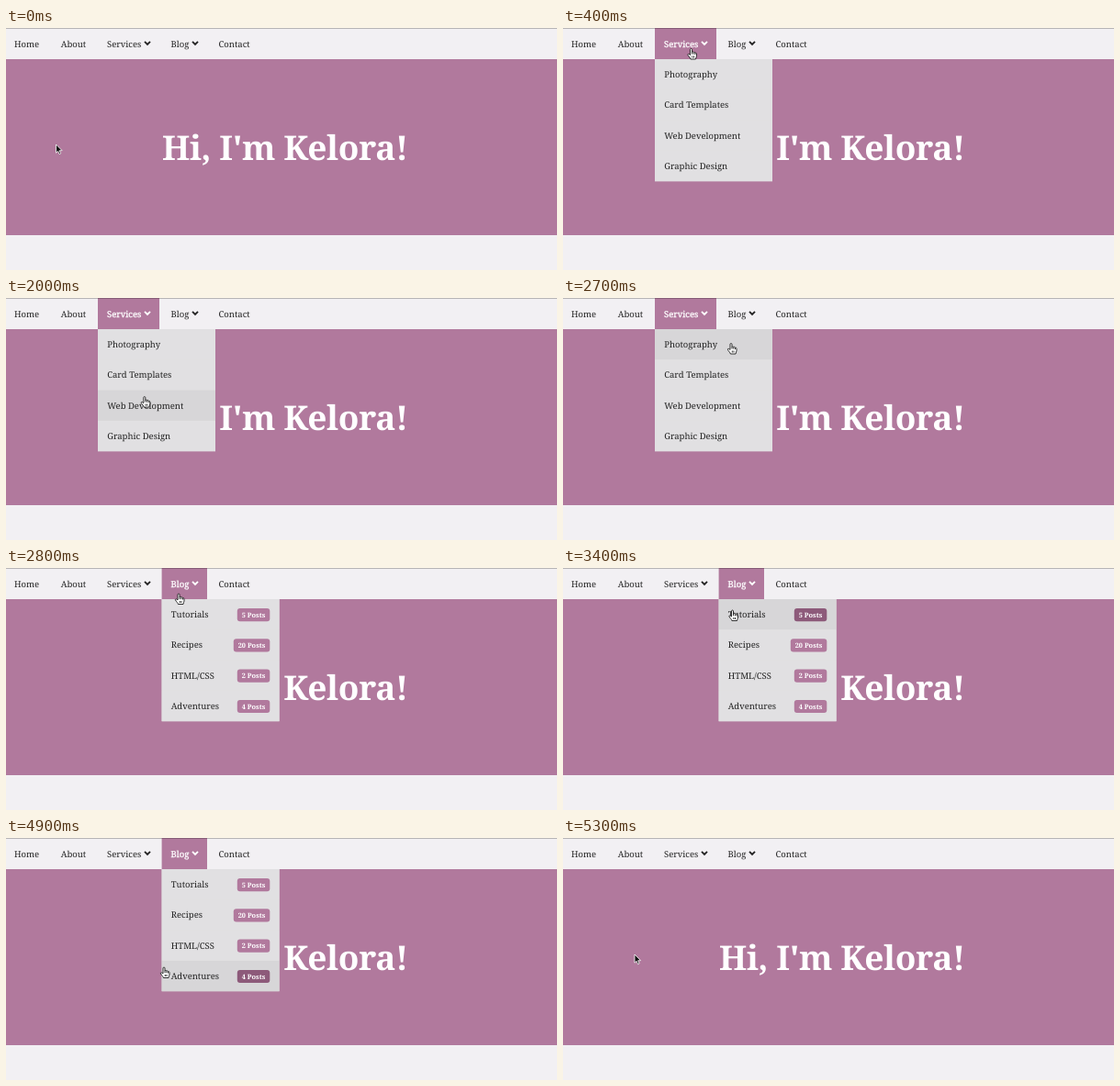
An HTML page that plays this animation: 600x264 px, repeating every 5.5 s.

```html
<!DOCTYPE html>
<html lang="en">
<head>
<meta charset="utf-8">
<title>Dropdown navigation</title>
<style>
  html, body { margin: 0; width: 100%; height: 100%; overflow: hidden; background: #f2f0f3; }
  svg { display: block; width: 100%; height: 100%; }
  text { font-family: "Noto Serif", serif; font-size: 9.5px; fill: #222; text-rendering: geometricPrecision; }
  .hero { font-size: 37px; font-weight: 600; fill: #fff; letter-spacing: -.4px; }
  .badge { font-size: 7.4px; font-weight: 600; fill: #fff; text-anchor: middle; }
  .chevron { fill: none; stroke: #222; stroke-width: 1.9; }
  .open .label { fill: #fff; stroke: #fff; stroke-width: .3; }
  .open .chevron { stroke: #fff; }
</style>
</head>
<body>
<svg id="stage" viewBox="0 0 600 264"></svg>
<script>
const LOOP = 5500, STEP = 100;
const NAV_H = 34, ROW_H = 33.3, MENU_W = 128;
const PURPLE = '#b1799d', DARK = '#8d5a7a', PANEL = '#e1e0e2', HOVER = '#d7d6d8';

const menus = [
  { label: 'Services', x: 100, w: 67, items: ['Photography', 'Card Templates', 'Web Development', 'Graphic Design'] },
  { label: 'Blog', x: 169.6, w: 49.4, items: ['Tutorials', 'Recipes', 'HTML/CSS', 'Adventures'], posts: [5, 20, 2, 4] }
];

// Pointer waypoints: [step, x, y]
const path = [
  [0, 54.5, 127], [1, 57, 124], [3, 118, 52], [4, 139.5, 22.5], [7, 140, 21],
  [8, 140, 17], [9, 140, 48], [11, 143, 143], [13, 139.5, 58.5], [15, 142, 79],
  [16, 142, 79], [17, 143, 50], [22, 156, 146], [23, 160, 122], [25, 160, 122],
  [26, 176, 78], [27, 183, 49.5], [28, 188, 28], [29, 190, 19], [31, 190, 19],
  [34, 184.5, 46], [35, 184.5, 46], [41, 195.5, 112.5], [46, 195, 146],
  [47, 195, 146], [49, 172, 141], [51, 112, 129], [53, 78, 127], [55, 78, 127]
];

const stage = document.getElementById('stage');

function add(parent, tag, attrs = {}, content = '') {
  const el = document.createElementNS('http://www.w3.org/2000/svg', tag);
  for (const key in attrs) el.setAttribute(key, attrs[key]);
  el.textContent = content;
  return parent.appendChild(el);
}
const rect = (parent, x, y, width, height, fill, rx = 0) =>
  add(parent, 'rect', { x, y, width, height, fill, rx });
const text = (parent, x, y, content, cls = '') =>
  add(parent, 'text', { x, y, class: cls }, content);
const show = (el, on) => el.setAttribute('visibility', on ? 'visible' : 'hidden');

rect(stage, 0, 0, 600, 264, '#f2f0f3');
rect(stage, 0, NAV_H, 600, 192, PURPLE);
text(stage, 170, 143.5, "Hi, I'm Kelora!", 'hero');
[['Home', 9], ['About', 59.7], ['Contact', 231.5]].forEach(([s, x]) => text(stage, x, 20.5, s));

function buildMenu(menu) {
  const { x, w, label, items, posts } = menu;
  menu.group = add(stage, 'g');
  menu.tab = rect(menu.group, x, 0, w, NAV_H, PURPLE);
  text(menu.group, x + 10, 20.5, label, 'label');
  add(menu.group, 'path', { class: 'chevron', d: `M${x + w - 16} 14.8l3 3 3-3` });
  menu.panel = add(menu.group, 'g');
  rect(menu.panel, x, NAV_H, MENU_W, ROW_H * 4, PANEL);
  menu.rows = items.map((item, i) => {
    const y = NAV_H + i * ROW_H;
    const back = rect(menu.panel, x, y, MENU_W, ROW_H, PANEL);
    text(menu.panel, x + 10.2, y + 20, item);
    if (!posts) return { back };
    const bw = posts[i] > 9 ? 39.5 : 35.5, bx = x + 117.7 - bw;
    const badge = rect(menu.panel, bx, y + 10, bw, 14.2, PURPLE, 3);
    text(menu.panel, bx + bw / 2, y + 19.8, posts[i] + ' Posts', 'badge');
    return { back, badge };
  });
}
menus.forEach(buildMenu);
add(stage, 'rect', { width: 600, height: 1, opacity: .25 });

const arrow = add(stage, 'path', {
  d: 'M0 0V9.2L2.1 7.3 3.6 10.7 5.1 10 3.7 6.7H6.6Z',
  fill: '#111', stroke: '#fff', 'stroke-width': .8
});
const hand = add(stage, 'path', {
  d: 'M-1 1C-1-.3 1-.3 1 1V4C1.3 3 2.8 3.2 2.8 4.3 3.2 3.5 4.5 3.8 4.5 4.9 5 4.4 6 4.7 6 5.8V8C6 9 5 10 5 11.5H-.6C-.8 10-2.4 9-3.5 7 -4 5.7-2.6 5.2-1 7Z' +
     'M1 4V6M2.8 4.5V6.2M4.5 5V6.5M1.3 8V10M3 8V10',
  fill: '#fff', stroke: '#111', 'stroke-width': .85, 'stroke-linejoin': 'round'
});

function pointerAt(step) {
  const i = path.findIndex(p => p[0] > step);
  const [s0, x0, y0] = path[i - 1], [s1, x1, y1] = path[i];
  const k = (step - s0) / (s1 - s0);
  return { x: x0 + (x1 - x0) * k, y: y0 + (y1 - y0) * k };
}

const onTab = (m, p) => p.y < NAV_H && p.x >= m.x && p.x < m.x + m.w;
const onPanel = (m, p) => p.y >= NAV_H && p.y < NAV_H + ROW_H * 4 && p.x >= m.x && p.x < m.x + MENU_W;

function render(time) {
  const step = Math.floor(time % LOOP / STEP);
  const p = pointerAt(step);
  // The panel under the pointer belongs to the last tab visited.
  let open = null;
  for (let s = 0; s <= step; s++) {
    const q = pointerAt(s);
    open = menus.find(m => onTab(m, q)) || (open && onPanel(open, q) ? open : null);
  }
  for (const m of menus) {
    const active = m === open;
    const row = active && p.y >= NAV_H ? Math.floor((p.y - NAV_H) / ROW_H) : -1;
    m.group.setAttribute('class', active ? 'open' : '');
    show(m.tab, active);
    show(m.panel, active);
    m.rows.forEach(({ back, badge }, i) => {
      back.setAttribute('fill', i === row ? HOVER : PANEL);
      if (badge) badge.setAttribute('fill', i === row ? DARK : PURPLE);
    });
  }
  show(hand, open);
  show(arrow, !open);
  (open ? hand : arrow).setAttribute('transform', `translate(${p.x} ${p.y})`);
}

const start = performance.now();
function tick() {
  render(performance.now() - start);
  requestAnimationFrame(tick);
}
tick();
</script>
</body>
</html>
```
